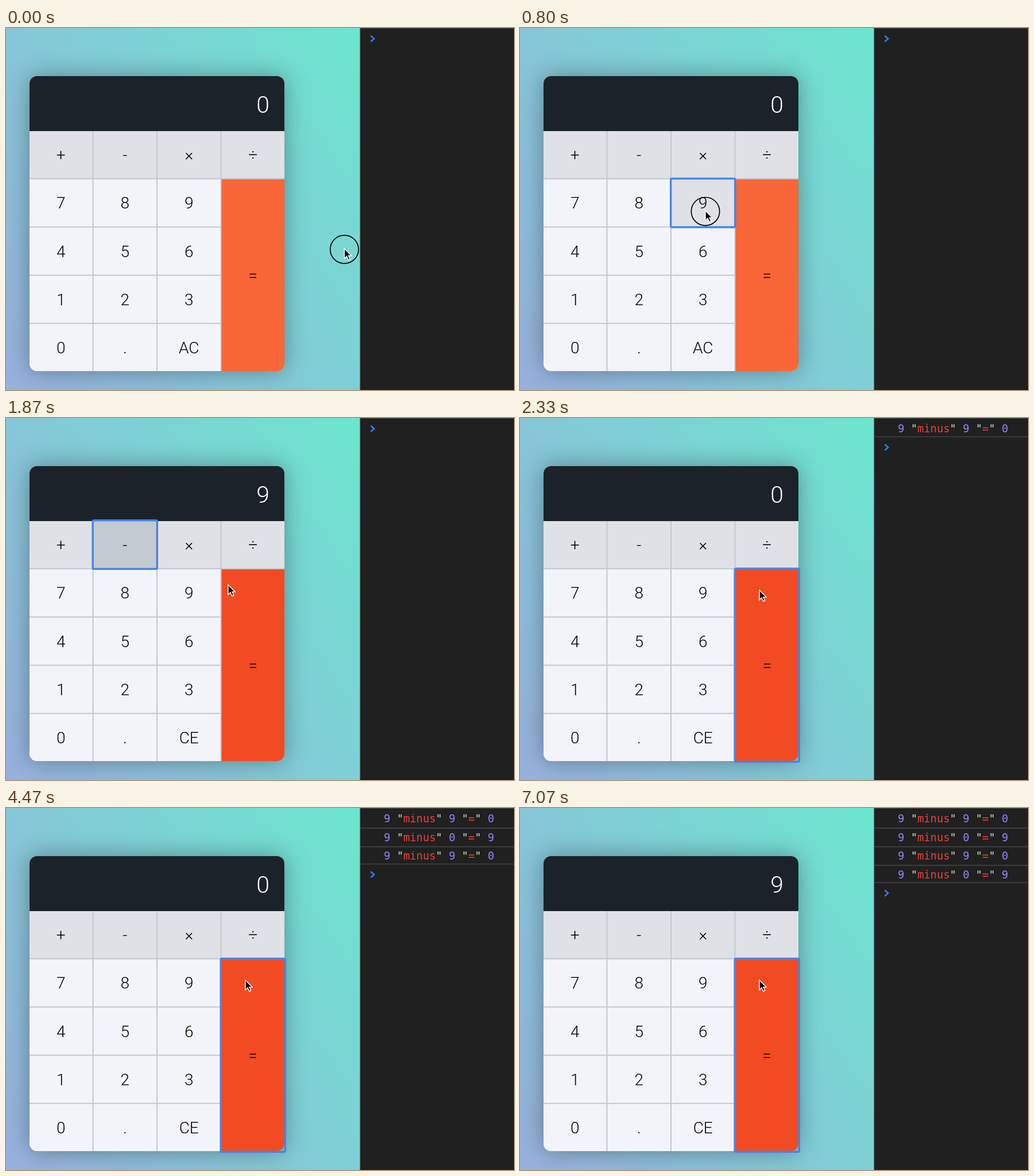
An HTML page for the animation above (7140 ms loop, 885 by 632 pixels).

```html
<!DOCTYPE html>
<html lang="en">
<head>
<meta charset="utf-8">
<title>Calculator and console</title>
<style>
html, body { margin: 0; width: 100%; height: 100%; overflow: hidden; background: #202020; }
#page { position: absolute; left: 0; top: 0; width: 617px; height: 632px; overflow: hidden;
  background: linear-gradient(236deg, #6ce6cf, #98b0dd); }
#shadow { position: absolute; left: 41px; top: 84px; width: 444px; height: 515px;
  border-radius: 13px; box-shadow: 0 0 40px rgba(0, 0, 0, .34); }
svg { position: absolute; left: 0; top: 0; display: block; }
.calc { font: 300 28px Roboto, sans-serif; text-anchor: middle; fill: #000; }
.log { font: 18.8px "DejaVu Sans Mono", monospace; white-space: pre; }
.num { fill: #9980ff; }
.str { fill: #e93f3b; }
.quote { fill: #d5d5d5; }
</style>
</head>
<body>
<div id="page"><div id="shadow"></div></div>
<svg id="stage" width="885" height="632" viewBox="0 0 885 632">
  <clipPath id="card"><rect x="41" y="84" width="444" height="515" rx="13"/></clipPath>
  <g clip-path="url(#card)">
    <rect x="41" y="84" width="444" height="515" fill="#c1c8cf"/>
    <rect x="41" y="84" width="444" height="96" fill="#1b222a"/>
    <g id="keys"></g>
  </g>
  <g id="labels" class="calc"></g>
  <text id="display" class="calc" x="459" y="148" style="font-size:41px;text-anchor:end;fill:#fff"></text>
  <rect id="ring" rx="2" fill="none" stroke="#4584e8" stroke-width="3.4"/>
  <path d="M617 0V632" stroke="#4a4a4a"/>
  <path d="M617 .5H885" stroke="#484848"/>
  <g id="rows" class="log"></g>
  <path id="prompt" d="M635.5 -5.2L641.3 0L635.5 5.2" fill="none" stroke="#367cf1" stroke-width="2.6"/>
  <g id="pointer">
    <circle id="click" cy="1.2" r="24.7" fill="none" stroke="#000" stroke-width="1.7"/>
    <path d="M0 0V17L4 13.2L6.8 19.5L9.7 18.3L7 12.2H12.2Z" stroke="#fff" stroke-width="1.4"/>
  </g>
</svg>
<script>
const NS = "http://www.w3.org/2000/svg";
const $ = id => document.getElementById(id);
const LOOP = 7140, TICK = 1000 / 15;

function add(parent, tag, attrs, text) {
  const el = document.createElementNS(NS, tag);
  for (const k in attrs) el.setAttribute(k, attrs[k]);
  if (text !== undefined) el.textContent = text;
  parent.append(el);
  return el;
}
const set = (el, attrs) => { for (const k in attrs) el.setAttribute(k, attrs[k]); };
const show = (el, on) => el.setAttribute("visibility", on ? "visible" : "hidden");

// Keys: fill at rest, fill when hovered
const FILLS = { op: ["#e0e1e6", "#c3cad1"], num: ["#f3f4fa", "#e0e1e6"], eq: ["#f96637", "#f24b23"] };
const keys = {};

function addKey(label, col, row, kind, span = 1) {
  const x = 41 + col * 111.5, y = 180 + row * 84.2;
  const w = 109.5, h = 82.2 + (span - 1) * 84.2;
  const rect = add($("keys"), "rect", { x, y, width: w, height: h });
  const text = add($("labels"), "text", { x: x + w / 2, y: y + h / 2 + 10 }, label);
  keys[label] = { x, y, w, h, kind, rect, text };
}
[..."+-×÷"].forEach((c, i) => addKey(c, i, 0, "op"));
["7", "8", "9", "4", "5", "6", "1", "2", "3", "0", ".", "AC"]
  .forEach((c, i) => addKey(c, i % 3, 1 + Math.floor(i / 3), "num"));
addKey("=", 3, 1, "eq", 4);

// Console rows
const rows = [["9", "0"], ["0", "9"], ["9", "0"], ["0", "9"]].map(([second, result], i) => {
  const g = add($("rows"), "g", {});
  const line = add(g, "text", { x: 658.3, y: 25.4 + i * 32.5 });
  const parts = [["num", "9 "], ["quote", '"'], ["str", "minus"], ["quote", '" '], ["num", second + " "],
    ["quote", '"'], ["str", "="], ["quote", '" '], ["num", result]];
  for (const [cls, text] of parts) add(line, "tspan", { class: cls }, text);
  const rule = add(g, "path", { stroke: "#424242", "stroke-width": 1.6 });
  return { g, rule };
});

// All times below are in ticks of 1/15 s
const moves = [
  { from: 0, to: 9, x: 323, y: 319 },
  { from: 13.5, to: 19.5, x: 222, y: 240.5 },
  { from: 23, to: 29.65, x: 417, y: 300.5 }
];
const presses = [[0, 1], [12, 14], [20, 22], [32, 34], [45, 47], [64, 66], [75, 77]];
const focus = [[12, "9"], [20, "-"], [32, "="]];
const values = [[0, "0"], [14, "9"], [34, "0"], [47, "9"], [66, "0"], [77, "9"]];
const logs = [35, 48, 67, 78];

const latest = (list, n) => list.filter(e => n >= e[0]).pop();
const ease = u => u * u * (3 - 2 * u);

function pointerAt(n) {
  let x = 589.5, y = 385.3;
  for (const m of moves) {
    const k = ease(Math.min(1, Math.max(0, (n - m.from) / (m.to - m.from))));
    x += (m.x - x) * k;
    y += (m.y - y) * k;
  }
  return { x, y };
}

function draw(ms) {
  const n = Math.floor((ms + 4) / TICK);
  const p = pointerAt(n);
  set($("pointer"), { transform: `translate(${p.x} ${p.y})` });
  show($("click"), presses.some(([a, b]) => n >= a && n < b));

  for (const label in keys) {
    const k = keys[label];
    const over = p.x >= k.x && p.x < k.x + k.w && p.y >= k.y && p.y < k.y + k.h;
    const held = label === "-" && n >= 22 && n < 34;
    set(k.rect, { fill: FILLS[k.kind][over || held ? 1 : 0] });
  }
  keys.AC.text.textContent = n < 14 ? "AC" : "CE";
  $("display").textContent = latest(values, n)[1];

  const f = latest(focus, n);
  show($("ring"), !!f);
  if (f) {
    const k = keys[f[1]];
    set($("ring"), { x: k.x - 1.3, y: k.y - 1.3, width: k.w + 2.6, height: k.h + 2.6 });
  }

  const count = logs.filter(t => n >= t).length;
  rows.forEach((r, i) => {
    show(r.g, i < count);
    const y = (i + 1) * 32.5 + (i === count - 1 ? 0.3 : 2.6);
    set(r.rule, { d: `M617 ${y}H885` });
  });
  set($("prompt"), { transform: `translate(0 ${18.7 + count * 32.5})` });
}

const start = performance.now();
function frame() {
  draw((performance.now() - start) % LOOP);
  requestAnimationFrame(frame);
}
frame();
</script>
</body>
</html>
```
